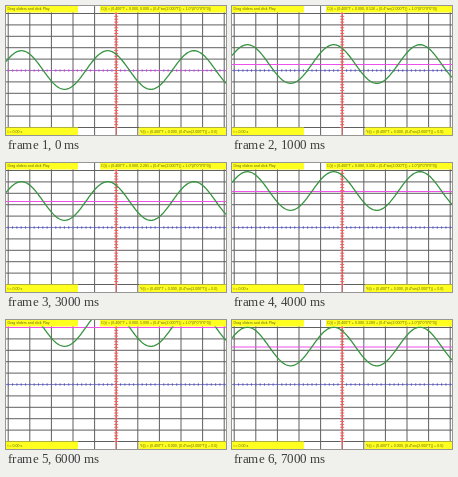
Write an HTML page with a canvas that moves like this. It is 220 by 129 pixels and loops after 8 s.

```html
<!DOCTYPE html>
<html lang="en">
<head>
<meta charset="utf-8">
<title>Vertical shift of a sine wave</title>
<style>
html, body { margin: 0; width: 100%; height: 100%; overflow: hidden; background: #fff; }
canvas { display: block; width: 220px; height: 129px; }
</style>
</head>
<body>
<canvas id="stage" width="220" height="129"></canvas>
<script>
const ctx = document.getElementById('stage').getContext('2d');
const W = 220, H = 129;
const AXIS_X = 109.7, AXIS_Y = 64;
const COL = 21.6, ROW = 11.4;
const BAR_TOP = 6.5, BAR_BOTTOM = 121.5;
const AMPLITUDE = 19.3, PERIOD = 86.3, CREST_X = 101.7;
const STEP = 1000;
// Height of the wave's midline above the axis, one value per step.
const SHIFTS = [0, 6, 16, 26, 36, 50.5, 57, 37.5];

function rect(x, y, w, h, color) {
  ctx.fillStyle = color;
  ctx.fillRect(x, y, w, h);
}

function label(value, x, y) {
  ctx.font = '3.6px "Liberation Sans", Arial, sans-serif';
  ctx.textBaseline = 'middle';
  ctx.fillStyle = '#66661c';
  ctx.fillText(value, x, y);
}

function drawGrid() {
  for (let i = -5; i <= 5; i++) {
    rect(AXIS_X + i * COL, 0, 1, H, '#606060');
    rect(0, AXIS_Y + i * ROW, W, 1, '#606060');
  }
}

function drawAxes(tickColor) {
  rect(0, AXIS_Y, W, 1, '#8888b0');
  for (let x = AXIS_X - 5 * COL; x < W; x += COL / 5) {
    rect(x, AXIS_Y - 0.6, 1.1, 2.2, tickColor);
  }
  rect(AXIS_X, 0, 1, H, '#d86060');
  for (let y = AXIS_Y - 5 * ROW; y < BAR_BOTTOM; y += ROW / 4) {
    rect(AXIS_X - 1.5, y, 4, 1, '#f06060');
  }
}

function drawWave(mid) {
  ctx.beginPath();
  for (let x = 0; x <= W; x++) {
    const phase = (x - CREST_X) * 2 * Math.PI / PERIOD;
    ctx.lineTo(x, mid - AMPLITUDE * Math.cos(phase));
  }
  ctx.strokeStyle = '#379440';
  ctx.lineWidth = 1.3;
  ctx.stroke();
}

function drawBars(shift) {
  const yellow = '#ffff20';
  rect(0, 0, 72, BAR_TOP, yellow);
  rect(94, 0, W - 94, BAR_TOP, yellow);
  rect(0, BAR_BOTTOM, 72, H - BAR_BOTTOM, yellow);
  rect(133, BAR_BOTTOM, W - 133, H - BAR_BOTTOM, yellow);
  const offset = (shift / ROW).toFixed(3);
  label('Drag sliders and click Play', 1.5, 3.2);
  label(`C(t) = (0.400*T + 0.000, ${offset} + (0.4*sin(2.000*T)) + 1.0*(0*0*0*0*0))`, 95, 3.2);
  label('t = 0.00 s', 1.5, 125.5);
  label('Y(t) = (0.400*T + 0.000, (0.4*sin(2.000*T)) + 0.0)', 134, 125.5);
}

function draw(time) {
  const shift = SHIFTS[Math.floor(time / STEP) % SHIFTS.length];
  const mid = AXIS_Y - shift;
  rect(0, 0, W, H, '#fff');
  drawGrid();
  rect(0, mid, W, 1, '#ee50ea');
  drawAxes(shift ? '#5050e0' : '#f030e8');
  drawWave(mid);
  drawBars(shift);
}

const start = performance.now();
function tick() {
  draw(performance.now() - start);
  requestAnimationFrame(tick);
}
tick();
</script>
</body>
</html>
```
